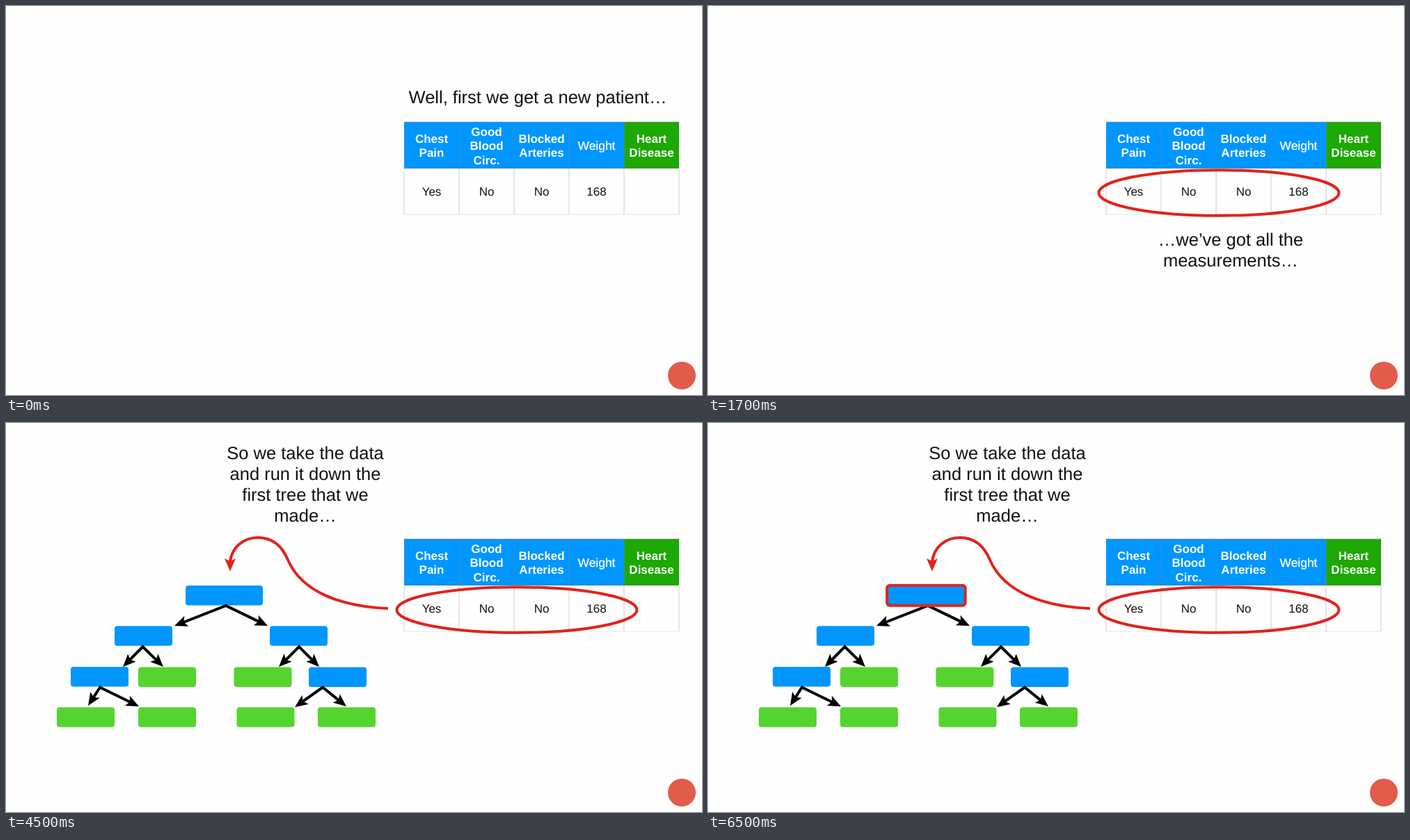
These frames come from a looping animation (1000x560 px, 8000 ms). An HTML page:

```html
<!DOCTYPE html>
<html lang="en">
<head>
<meta charset="utf-8">
<title>Running a new patient down a tree</title>
<style>
  html, body { margin: 0; width: 100%; height: 100%; overflow: hidden; background: #fefefe; }
  svg { display: block; width: 100vw; height: 100vh; }
  text { font-family: "Liberation Sans", Arial, sans-serif; text-anchor: middle; text-rendering: geometricPrecision; }
  .caption { font-size: 25.5px; fill: #111; }
  .cell { font-size: 17px; fill: #111; }
  .head { font-size: 17.4px; fill: #fff; stroke: #fff; stroke-width: .3; }
  .bold { font-size: 17px; font-weight: bold; stroke: none; }
  .mark { fill: none; stroke: #e0231a; stroke-width: 4; }
  .branch { fill: none; stroke: #000; stroke-width: 4; }
  .rule { stroke: #808080; stroke-opacity: .6; stroke-width: 1; }
</style>
</head>
<body>
<svg id="stage" viewBox="0 0 1000 560"></svg>
<script>
const BLUE = '#0096ff', LEAF = '#55d42f', GREEN = '#1ea803', RED = '#e0231a';
const LOOP = 8000;
const stage = document.getElementById('stage');

function add(parent, tag, attrs = {}, content = '') {
  const el = document.createElementNS('http://www.w3.org/2000/svg', tag);
  for (const key in attrs) el.setAttribute(key, attrs[key]);
  el.textContent = content;
  return parent.appendChild(el);
}

function lines(parent, cls, x, y, step, rows) {
  rows.forEach((row, i) => add(parent, 'text', { class: cls, x, y: y + i * step }, row));
}

// A group that is visible while one of its [from, to) spans covers the time.
const scenes = [];
function scene(...spans) {
  const group = add(stage, 'g');
  scenes.push({ group, spans });
  return group;
}

function arrowHead(parent, x, y, angle, fill) {
  add(parent, 'path', {
    d: 'M0 0L-18.5 -8L-14.5 0L-18.5 8Z', fill,
    transform: `translate(${x} ${y}) rotate(${angle})`
  });
}

function fork(parent, x, y, ...tips) {
  const ends = tips.map(([tx, ty]) => {
    const angle = Math.atan2(ty - y, tx - x);
    arrowHead(parent, tx, ty, angle * 180 / Math.PI, '#000');
    return `${tx - 13 * Math.cos(angle)} ${ty - 13 * Math.sin(angle)}`;
  });
  add(parent, 'path', { class: 'branch', d: `M${ends[0]}L${x} ${y}L${ends[1]}` });
}

function box(parent, x, y, fill, width = 83) {
  add(parent, 'rect', { x, y, width, height: 28.5, rx: 4, fill });
}

function drawTable() {
  const left = 572, top = 167, col = 79, mid = 234, bottom = 300, right = left + 5 * col;
  const columns = [
    [['Chest', 'Pain'], 'Yes'],
    [['Good', 'Blood', 'Circ.'], 'No'],
    [['Blocked', 'Arteries'], 'No'],
    [['Weight'], '168'],
    [['Heart', 'Disease'], '']
  ];
  columns.forEach(([title, value], i) => {
    const x = left + i * col, cx = x + col / 2;
    add(stage, 'rect', { x, y: top, width: col, height: mid - top, fill: i < 4 ? BLUE : GREEN });
    if (i) add(stage, 'path', { d: `M${x} ${top}V${mid}`, stroke: '#3f8fc4', 'stroke-width': 1 });
    const style = title.length > 1 ? 'head bold' : 'head';
    lines(stage, style, cx, 207 - (title.length - 1) * 10.25, 20.5, title);
    add(stage, 'text', { class: 'cell', x: cx, y: 273 }, value);
  });
  add(stage, 'path', { class: 'rule', d: `M${left} ${top}H${right}M${left} ${mid - .5}H${right}` });
  let sides = '';
  for (let i = 0; i <= 5; i++) sides += `M${left + i * col} ${mid}V${bottom}`;
  add(stage, 'path', { d: sides, stroke: '#d4d4d4', 'stroke-width': 1.2 });
  add(stage, 'path', { d: `M${left} ${bottom}H${right}`, stroke: '#e6e6e6', 'stroke-width': 1 });
}

function drawTree(g) {
  box(g, 258, 234, BLUE, 111);
  [[156, 292.3], [379, 292.3], [93, 351], [435, 351.5]].forEach(([x, y]) => box(g, x, y, BLUE));
  [[190, 351.5], [327.5, 351.5], [73, 409.3], [190, 409.3], [331.5, 409.3], [448, 409.3]]
    .forEach(([x, y]) => box(g, x, y, LEAF));
  fork(g, 316, 263, [242, 292], [376, 292]);
  fork(g, 196.5, 322, [168, 351], [226, 351]);
  fork(g, 421, 322, [392, 351], [450, 351]);
  fork(g, 135, 380.5, [118, 407], [191, 408]);
  fork(g, 455, 380.5, [415, 409], [489, 408]);
}

drawTable();
add(stage, 'circle', { cx: 971, cy: 532, r: 20, fill: '#e25b4b' });

lines(scene([0, 500]), 'caption', 764, 140, 30, ['Well, first we get a new patient…']);

add(scene([500, 2500], [4500, LOOP]), 'ellipse', { class: 'mark', cx: 734, cy: 269, rx: 172.5, ry: 32.8 });

lines(scene([500, 2500]), 'caption', 751, 345.3, 30, ['…we’ve got all the', 'measurements…']);

const question = scene([2500, 4500]);
add(question, 'ellipse', { class: 'mark', cx: 929.6, cy: 267, rx: 40.2, ry: 35 });
lines(question, 'caption', 858.3, 345.3, 30, ['…and now we want to', 'know if they have heart', 'disease or not.']);

const tree = scene([4500, LOOP]);
lines(tree, 'caption', 430, 51.7, 30, ['So we take the data', 'and run it down the', 'first tree that we', 'made…']);
add(tree, 'path', {
  class: 'mark',
  d: 'M549 267C480 264 425 243 405 197C395 173 379 165 362 165C340 165 324 180 322 200'
});
arrowHead(tree, 322, 213.5, 90, RED);
drawTree(tree);

add(scene([6500, LOOP]), 'rect', { class: 'mark', x: 257.2, y: 233.7, width: 112.5, height: 29, rx: 4 });

function render(time) {
  for (const { group, spans } of scenes) {
    const visible = spans.some(([from, to]) => time >= from && time < to);
    group.setAttribute('display', visible ? 'inline' : 'none');
  }
}

const start = performance.now();
function tick() {
  render((performance.now() - start) % LOOP);
  requestAnimationFrame(tick);
}
tick();
</script>
</body>
</html>
```
